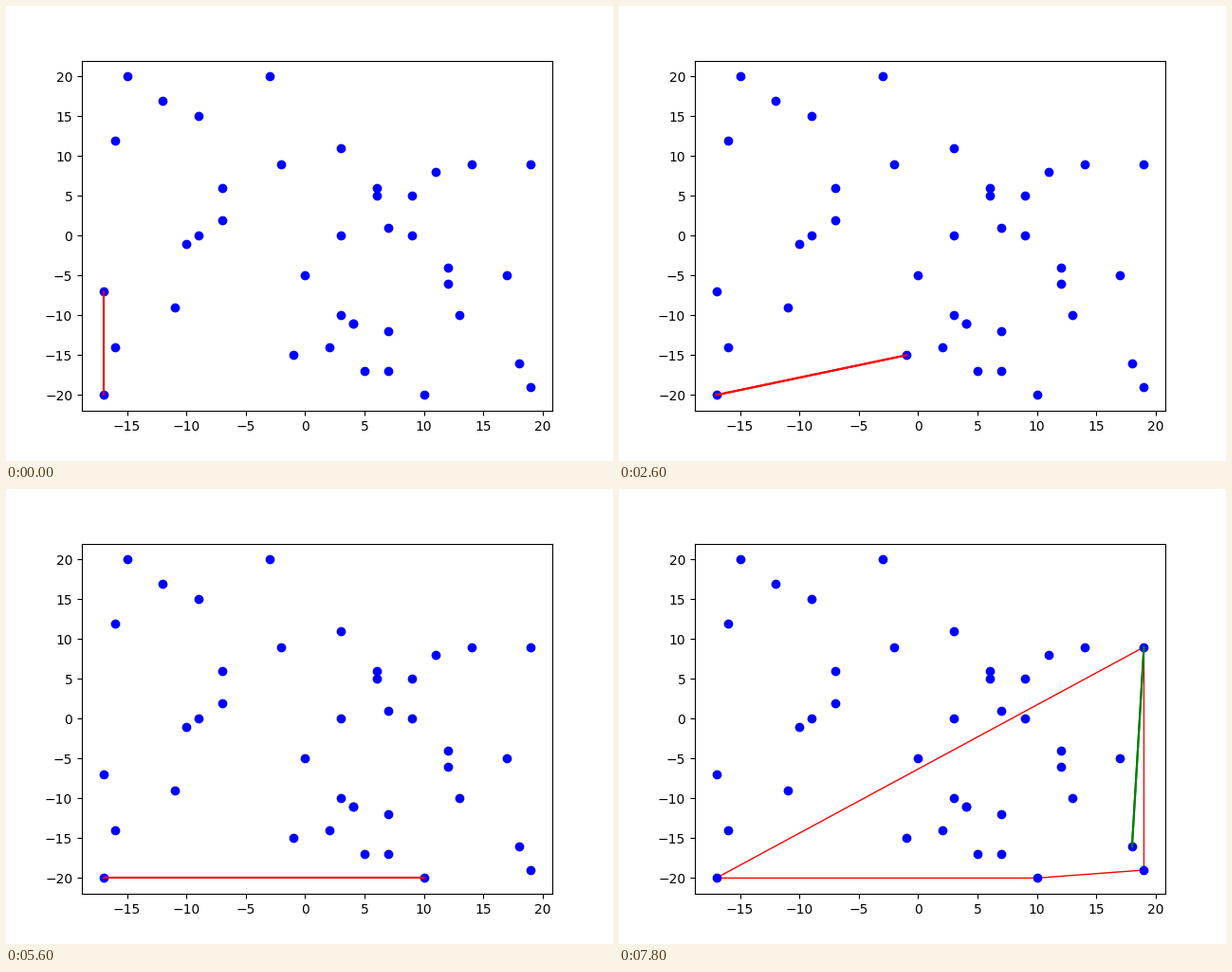
A matplotlib script for the animation above (8000 ms loop, 640x480 px).

```python
import matplotlib.pyplot as plt
from matplotlib.animation import FuncAnimation
from matplotlib.patches import Polygon

# scattered data: x -> y values in that column
COLUMNS = {
    -17: [-20, -7], -16: [-14, 12], -15: [20], -12: [17], -11: [-9],
    -10: [-1], -9: [0, 15], -7: [2, 6], -3: [20], -2: [9], -1: [-15],
    0: [-5], 2: [-14], 3: [-10, 0, 11], 4: [-11, -11], 5: [-17], 6: [5, 6],
    7: [-17, -12, 1], 9: [0, 5], 10: [-20], 11: [8], 12: [-6, -4],
    13: [-10], 14: [9], 17: [-5], 18: [-16], 19: [-19, 9],
}
FRAMES = 40
INTERVAL = 200


def cross(o, a, b):
    return (a[0] - o[0]) * (b[1] - o[1]) - (a[1] - o[1]) * (b[0] - o[0])


def chain_steps(points):
    """Half hull after each added point, from the second point on."""
    hull, steps = [], []
    for p in points:
        while len(hull) > 1 and cross(hull[-2], hull[-1], p) <= 0:
            hull.pop()
        hull.append(p)
        steps.append(list(hull))
    return steps[1:]


points = [(x, y) for x, ys in COLUMNS.items() for y in ys]
ordered = sorted(set(points))
lower = chain_steps(ordered)
upper = chain_steps(ordered[::-1])

fig, ax = plt.subplots(figsize=(6.4, 4.8), dpi=100)
ax.plot(*zip(*points), "bo")
done = ax.add_patch(Polygon(lower[-1], closed=True, fill=False,
                            edgecolor="red", lw=1, visible=False))
edges = []


def draw(i):
    while edges:
        edges.pop().remove()
    first_half = i < len(lower)
    hull = lower[i] if first_half else upper[i - len(lower)]
    color = "red" if first_half else "green"
    # one line per edge, so level and upright edges stay crisp
    for a, b in zip(hull, hull[1:] + hull[:1]):
        edges.extend(ax.plot(*zip(a, b), color=color, lw=1.5))
    done.set_visible(not first_half)
    return [done, *edges]


anim = FuncAnimation(fig, draw, frames=FRAMES, interval=INTERVAL,
                     init_func=lambda: draw(0), repeat=True, repeat_delay=0)
plt.show()
```
